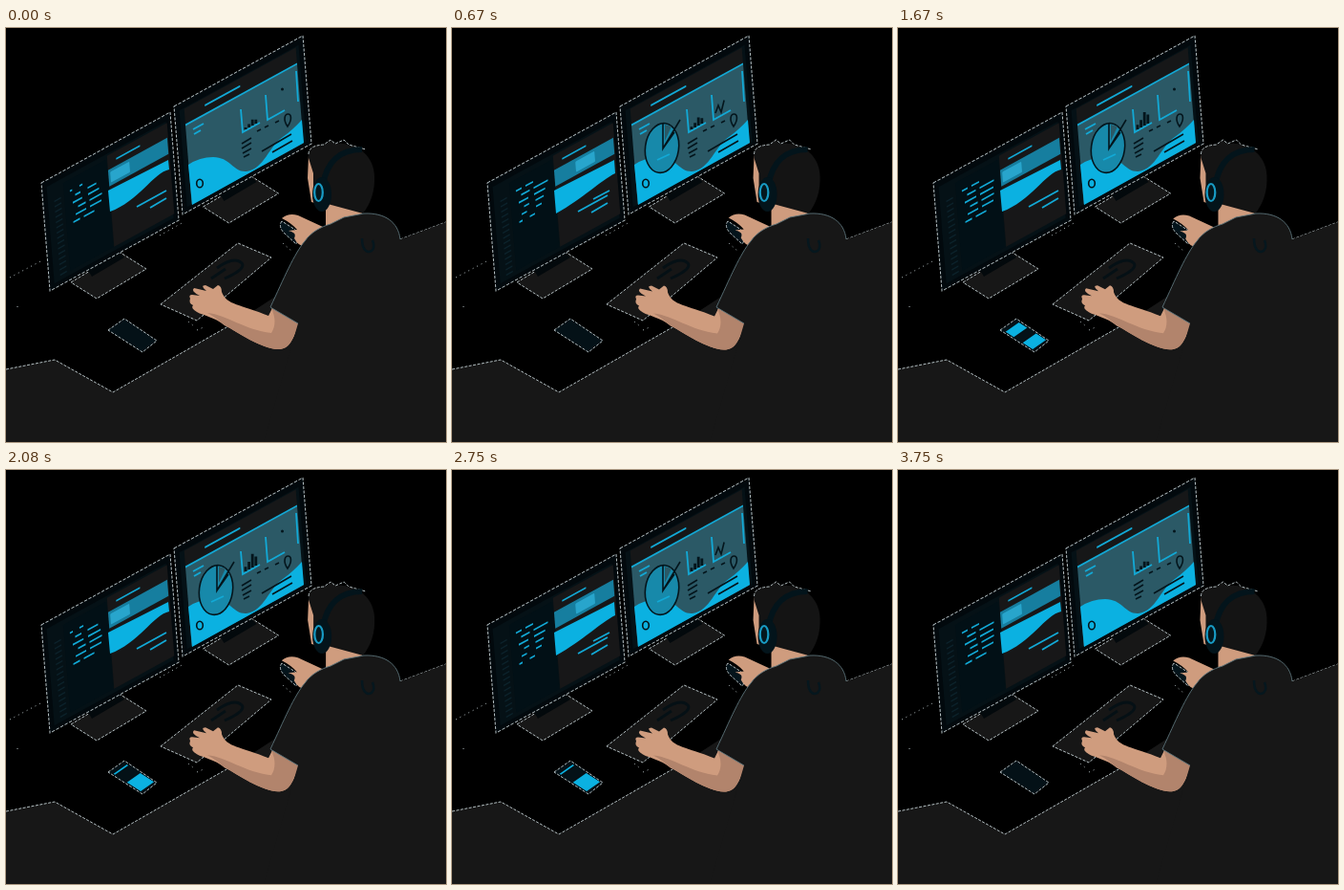
Recreate the animation shown at these times as an HTML page. Size 461 by 433 pixels, loop 3830 ms.

```html
<!DOCTYPE html>
<html lang="en">
<head>
<meta charset="utf-8">
<title>Developer at work</title>
<style>
html, body { margin: 0; width: 100%; height: 100%; overflow: hidden; background: #000; }
svg { display: block; width: 461px; height: 433px; }
.edge { stroke: #b4bfc2; stroke-width: 1; stroke-dasharray: 3 1.5; }
.rim { fill: none; stroke: #5d747b; stroke-width: .9; }
.specks { fill: none; stroke: #b4bfc2; stroke-dasharray: 1 4; }
.line { fill: none; stroke: #12a9d6; stroke-width: 1.8; }
.ink { fill: none; stroke: #04151c; stroke-width: 1.6; }
.bar { stroke-width: 2.8; }
.cyan { fill: #0bb1e1; }
.skin { fill: #cf9c7e; }
.shade { fill: #b2846c; }
.cloth { fill: #171717; }
</style>
</head>
<body>
<svg viewBox="0 0 461 433">
  <defs>
    <g id="stand">
      <path class="edge" fill="#171717" d="M68 266 120 235 147 252 95 283Z"/>
      <path fill="#03090c" d="M85 252 118 234 124 240 90 260Z"/>
    </g>
    <g id="frame">
      <path class="edge" fill="#02090d" d="M0 0H135V113H0Z"/>
      <path fill="#051116" d="M5 7H130V108H5Z"/>
    </g>
  </defs>

  <path class="specks" d="M4 261 38 243M161 217 186 203M12 291v1M191 307 197 312M200 316 207 313"/>
  <path class="cloth" d="M0 357 51 347 112 381 245 305 330 250 413 221 461 203V433H0Z"/>
  <path class="edge" fill="none" d="M0 357 51 347 112 381 245 305M413 221 461 203"/>

  <use href="#stand"/>
  <use href="#stand" x="138.500" y="-79"/>

  <g transform="matrix(1 -.548 .08 1 37 162)">
    <use href="#frame"/>
    <path fill="#021016" d="M22 12H67V104H22Z"/>
    <path fill="#171718" d="M68 9H131V104H68Z"/>
    <path stroke="#0c222b" stroke-width="7" stroke-dasharray="1.5 4" d="M15 25V104"/>
    <path class="line" d="M77 17H102"/>
    <path fill="#167e9f" d="M68 24H130V41H68Z"/>
    <rect id="card" y="27" width="20" height="11" rx="1" fill="#28a5cc"/>
    <path id="code" class="line"/>
  </g>
  <path id="hill" class="cyan"/>
  <g id="notes" class="line">
    <path d="M137 187 168 170M151 188 168 178"/>
    <path id="note" d="M153 174 170 165"/>
  </g>

  <g transform="matrix(1 -.548 .08 1 176 82)">
    <use href="#frame"/>
    <path fill="#161718" d="M10 8H127V25H10Z"/>
    <path class="line" d="M31 16H68"/>
    <path fill="#2b5966" d="M10 25H127V108H10Z"/>
    <path class="line" d="M10 25H127"/>
  </g>
  <path class="cyan" d="M191 143Q203 135 217 135C235 135 238 151 252 150C271 147 275 124 290 114Q300 107 310 96L312 120 195 185Z"/>
  <path class="line" d="M196 106 207 100M197 111 204 107M246 85 248 109 266 99M272 70 274 96 292 86M304 45 306 77"/>
  <path class="ink" d="M247 121 257 115M247 126 257 120M248 131 257 126M249 135 255 132M263 108 267 106M271 104 275 102M282 99 286 97M268 129 299 111M279 130 300 118"/>
  <ellipse class="ink" cx="203" cy="162.500" rx="3.300" ry="4.300"/>
  <path class="ink" d="M295 103C290 96 292 90 295.500 90S300 96 295 103Z"/>
  <path id="bars" class="ink bar"/>
  <path id="trend" class="ink" pathLength="1" d="M276 89 279 81 282 88 285 76 289 64"/>
  <circle id="dot" cx="289.500" cy="64" r="1.500" fill="#04151c"/>
  <g id="pie">
    <ellipse class="ink" cx="220" cy="125.500" rx="17.500" ry="26" transform="rotate(8 220 125.500)" style="fill:#1789aa"/>
    <path class="ink" d="M221 99V126L239 96M221 126 233 109"/>
    <path fill="#2b5966" d="M223 101 230 103 223 118Z"/>
    <path class="line" d="M215 138 228 132"/>
  </g>

  <path class="edge" fill="#161616" d="M162 289 243 225 278 240 200 306Z"/>
  <path fill="none" stroke="#051015" stroke-width="3" d="M221 251Q238 239 246 245T229 262M215 262 230 252"/>
  <path class="edge" fill="#041117" d="M107 316 124 304 158 327 143 339Z"/>
  <g transform="matrix(.17 -.12 .36 .23 107 316)">
    <path id="phone" class="cyan"/>
  </g>

  <path class="edge" fill="#04141b" d="M289 202Q285 207 291 214L304 226Q309 219 303 211Z"/>
  <path class="specks" d="M290 225 300 234"/>
  <path id="mouseHand" class="skin" d="M289 199Q296 193 306 196L332 208 314 229Q306 228 302 220C305 214 299 213 296 212L305 211Q299 204 289 199Z"/>

  <g id="typeHand">
    <path class="skin" d="M193 283Q191 279 195 279L203 280Q193 275 197 272L210 275Q203 269 209 269L217 273 222 269Q226 270 226 276C231 290 246 289 275 301L280 291 307 308C301 326 297 336 285 336 266 335 245 319 229 311 218 302 207 301 200 297Q193 293 196 290 191 288 193 283Z"/>
    <path class="shade" d="M211 298C232 300 250 316 278 319Q285 308 278 293L307 308C301 326 297 336 285 336 266 335 245 319 229 311Q219 302 211 298Z"/>
  </g>

  <g id="head">
    <path class="skin" d="M317 133 316 157 320 182 335 186V208L354 201 373 197 373 180 340 150Z"/>
    <path fill="#141414" d="M317 136C315 125 322 121 333 122L340 117 345 121C367 118 386 134 386 155Q387 177 374 194L337 184 322 178 322 152Z"/>
    <path class="edge" fill="none" d="M317 132Q317 123 333 122L340 117 345 121 354 117 359 122 377 127"/>
    <path fill="none" stroke="#03141b" stroke-width="6" d="M332 164C336 140 350 127 373 127"/>
    <ellipse cx="331" cy="174" rx="10" ry="18" fill="#03141b"/>
    <ellipse cx="327.500" cy="172" rx="4.300" ry="9" fill="#04181f" stroke="#189bc4" stroke-width="2.200"/>
  </g>
  <path class="cloth" d="M277 292C291 262 302 236 313 223 320 213 330 208 340 205L354 198 375 194C397 193 411 203 413 221L461 203V433H270L306 309Z"/>
  <path class="rim" d="M306 309 277 292C291 262 302 236 313 223 320 213 330 208 340 205L354 198 375 194C397 193 411 203 413 221"/>
  <path fill="none" stroke="#06171e" stroke-width="2.500" d="M373 220C373 232 378 236 383 233Q387 230 384 222"/>
</svg>
<script>
const LOOP = 3830, STEP = LOOP / 46, CYCLE = STEP * 25;
const $ = id => document.getElementById(id);
const set = (id, name, value) => $(id).setAttribute(name, value);
const move = (id, x, y) => set(id, 'transform', `translate(${x} ${y})`);
const ramp = (t, a, b) => Math.min(1, Math.max(0, (t - a) / (b - a)));
const smooth = (t, a, b) => { const k = ramp(t, a, b); return k * k * (3 - 2 * k); };
const band = (top, bottom) => `M8 ${top}H90V${bottom}H8Z`;

function drawCode(phase) {
  let d = '';
  for (let row = 0; row < 6; row++) {
    const p = (phase + 1 - row * .07) % 1;
    const grow = p < .25 ? .4 + p * 2.4 : p > .8 ? 1 - (p - .8) * 3 : 1;
    const x = 28 + row * 5 % 8, first = 6 + row * 3 % 7, second = 8 + row * 7 % 8;
    const y = 24 + row * 6.6;
    d += `M${x} ${y}h${first * grow}M${x + first + 4} ${y}h${second * grow}`;
  }
  set('code', 'd', d);
}

function drawBars(t) {
  const scale = 1.15 - .45 * Math.cos(2 * Math.PI * t / LOOP);
  set('bars', 'd', [3, 5, 9, 6].map((h, i) =>
    `M${251 + i * 3.6} ${106 - i * 2}v${-h * scale}`).join(''));
}

function drawPhone(t) {
  const on = t > 1400 && t < 3250;
  set('phone', 'd', !on ? '' : t < 1900
    ? band(12, 36) + band(62, 91)
    : band(12, 16) + band(51, 91));
}

function draw(now) {
  const t = Math.floor(now % LOOP / STEP) * STEP;
  const q = t % CYCLE;
  const k = smooth(q, 400, 620) - smooth(q, 1200, 1450);
  const turn = 2 * Math.PI * q / CYCLE;

  drawCode(q / CYCLE);
  drawBars(t);
  drawPhone(t);
  set('card', 'x', 70 + 20 * k);
  set('hill', 'd', `M107 170 170 138 171 ${148 + 4 * k}C155 ${151 + 9 * k} 138 ${182 - 4 * k} 109 ${192 + 2 * k}Z`);
  move('notes', -5 * k, 5 * k);
  set('note', 'opacity', k);

  const head = ramp(q, 420, 770), tail = ramp(q, 750, 1450);
  const shown = Math.max(0, head - tail);
  $('trend').style.strokeDasharray = `0 ${tail} ${shown} 2`;
  set('trend', 'opacity', shown > 0 ? 1 : 0);
  set('dot', 'opacity', q < 420 || q > 1400 ? 1 : 0);

  const size = smooth(t, 160, 560) - smooth(t, 3150, 3500);
  set('pie', 'transform', `translate(220 125) scale(${size}) translate(-220 -125)`);

  move('head', -.5 * Math.sin(turn), 0);
  move('mouseHand', .8 * Math.sin(turn), -.6 * Math.sin(turn));
  move('typeHand', 0, -.6 * Math.sin(turn * 2));
}

function tick() {
  draw(performance.now());
  requestAnimationFrame(tick);
}
tick();
</script>
</body>
</html>
```
